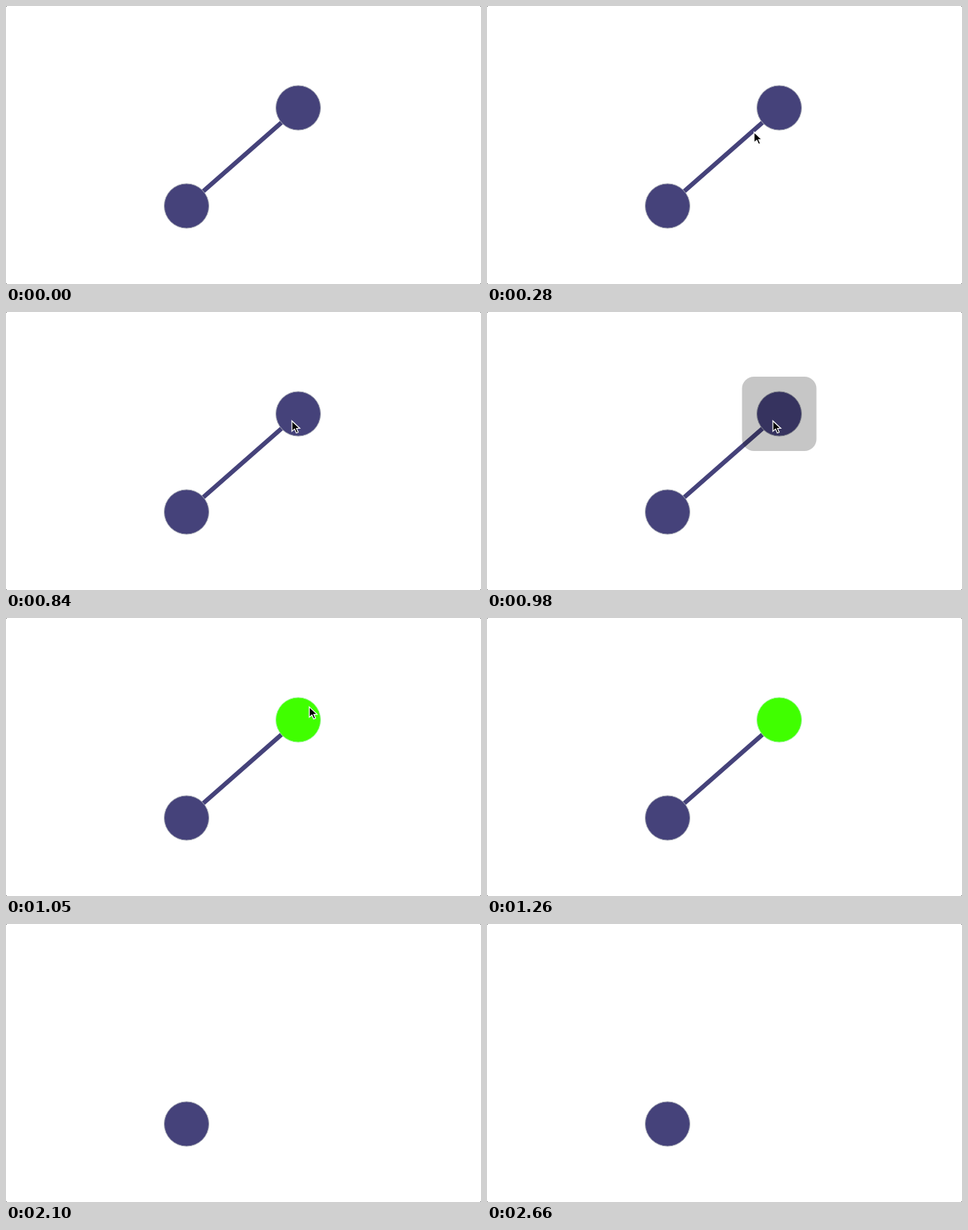
An HTML page with a canvas that plays this animation: 638 by 374 pixels, repeating every 3.15 s.

```html
<!DOCTYPE html>
<html lang="en">
<head>
<meta charset="utf-8">
<style>
  html, body { margin: 0; width: 100%; height: 100%; overflow: hidden; background: #fff; }
  canvas { display: block; }
</style>
</head>
<body>
<canvas id="stage" width="638" height="374"></canvas>
<script>
const ctx = document.getElementById('stage').getContext('2d');
const LOOP = 3150, STEP = 70;
const PURPLE = '#45427a', GREEN = '#40ff00';
const PURPLE_RIM = '#a5a8b4', GREEN_RIM = '#9cf596';
const point = (x, y) => ({ x, y });
const first = point(242.5, 269), second = point(392.5, 137);
const clickSpot = point(403, 115), restSpot = point(384, 145);

const linear = u => u;
const easeIn = u => u ** 1.5;
const easeOut = u => 1 - (1 - u) ** 2;

function glide(t, start, end, from, to, ease) {
  const u = ease(Math.min(1, (t - start) / (end - start)));
  return point(from.x + (to.x - from.x) * u, from.y + (to.y - from.y) * u);
}

// Enter, click, settle, leave at the top, then sweep down the right side
function pointerAt(t) {
  if (t >= 70 && t < 560) return glide(t, 70, 490, point(226, 328), clickSpot, easeOut);
  if (t >= 560 && t < 980) return glide(t, 560, 770, clickSpot, restSpot, easeOut);
  if (t >= 980 && t < 1260) return glide(t, 980, 1190, restSpot, point(505, 5), easeIn);
  if (t >= 2520 && t < 2660) return glide(t, 2520, 2590, point(521, 87), point(503, 265), linear);
  return null;
}

function circle(x, y, r) {
  ctx.beginPath();
  ctx.arc(x, y, r, 0, Math.PI * 2);
}

function stroke(color, width) {
  ctx.strokeStyle = color;
  ctx.lineWidth = width;
  ctx.stroke();
}

function drawNode({ x, y }, color, rim) {
  circle(x, y, 30);
  ctx.fillStyle = color;
  ctx.fill();
  stroke(rim, 1);
}

function drawEdge() {
  ctx.beginPath();
  ctx.moveTo(first.x, first.y);
  ctx.lineTo(second.x, second.y);
  stroke(PURPLE, 6);
}

function drawHighlight({ x, y }) {
  ctx.beginPath();
  ctx.roundRect(x - 50, y - 50, 100, 100, 16);
  ctx.fillStyle = 'rgba(0, 0, 0, 0.225)';
  ctx.fill();
}

function drawRing({ x, y }) {
  circle(x, y + 2, 20);
  stroke('#fff', 5);
  stroke('#000', 3);
}

const arrow = new Path2D('M0 1V15L3.6 11.9L6 17.3L8.5 16.2L6.2 11H10.6Z');

function drawPointer({ x, y }) {
  ctx.save();
  ctx.translate(x, y + 0.5);
  ctx.fillStyle = '#000';
  ctx.strokeStyle = '#fff';
  ctx.lineWidth = 1.2;
  ctx.fill(arrow);
  ctx.stroke(arrow);
  ctx.restore();
}

function drawCorners() {
  ctx.fillStyle = '#777';
  for (const x of [0, 637]) for (const y of [0, 373]) ctx.fillRect(x, y, 1, 1);
}

function draw(t) {
  ctx.fillStyle = '#fff';
  ctx.fillRect(0, 0, 638, 374);
  drawCorners();
  const linked = t < 2100;
  if (linked) drawEdge();
  drawNode(first, PURPLE, PURPLE_RIM);
  if (linked) {
    if (t < 1050) drawNode(second, PURPLE, PURPLE_RIM);
    else drawNode(second, GREEN, GREEN_RIM);
  }
  if (t === 980) drawHighlight(second);
  const pointer = pointerAt(t);
  if (pointer) {
    if (t === 490) drawRing(pointer);
    drawPointer(pointer);
  }
}

const start = performance.now();
function tick() {
  const t = (performance.now() - start) % LOOP;
  draw(Math.floor(t / STEP) * STEP);
  requestAnimationFrame(tick);
}
tick();
</script>
</body>
</html>
```
